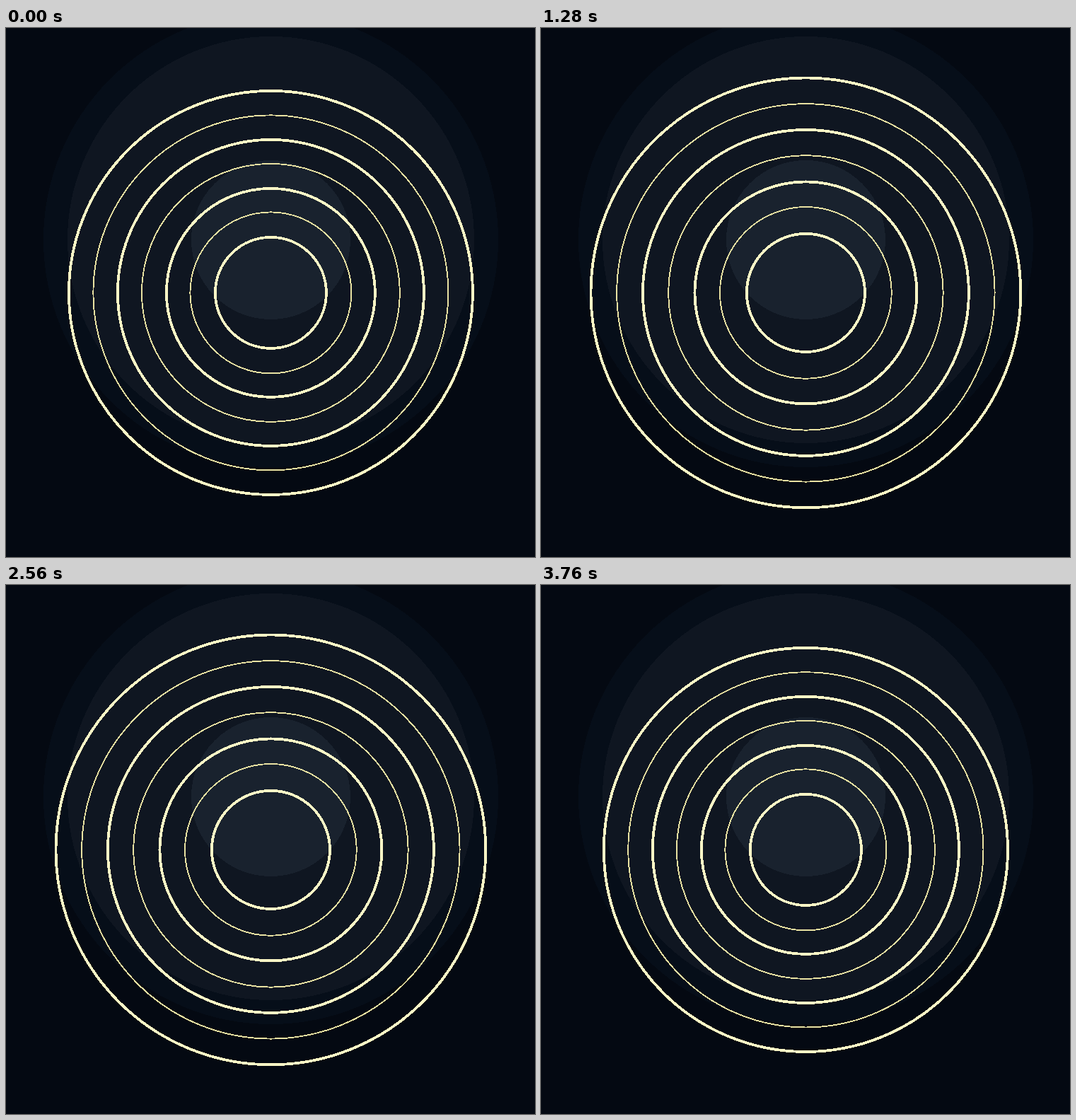
Animation of 748x748 px, one loop 3840 ms. Source, as an HTML page:

```html
<!DOCTYPE html>
<html lang="en">
<head>
<meta charset="utf-8">
<title>Breathing rings</title>
<style>
  html, body { margin: 0; width: 100%; height: 100%; overflow: hidden; background: #040912; }
  svg { display: block; width: 748px; height: 748px; }
</style>
</head>
<body>
<svg viewBox="0 0 748 748" shape-rendering="crispEdges">
  <g id="glow"></g>
  <g id="rings" fill="none"></g>
</svg>
<script>
const LOOP = 3840, STEP = 40, GROWTH = 0.086;

function addCircle(parent, attrs) {
  const circle = document.createElementNS('http://www.w3.org/2000/svg', 'circle');
  for (const name in attrs) circle.setAttribute(name, attrs[name]);
  document.getElementById(parent).append(circle);
  return circle;
}

[[321.5, '#060e19'], [287.5, '#0f1621'], [112.5, '#19222e']].forEach(([r, fill]) =>
  addCircle('glow', { cx: 374.5, cy: 299.5, r, fill }));

// Thick and thin rings alternate from the outside in.
const rings = Array.from({ length: 7 }, (_, i) => {
  const thin = i % 2;
  const radius = thin ? 251 - 68.5 * (i - 1) / 2 : 285.5 - 69 * i / 2;
  const circle = addCircle('rings', {
    cx: 374.4, cy: 374.4,
    stroke: thin ? '#e9e2a2' : '#fdf8c6',
    'stroke-width': thin ? 1.9 : 3.8
  });
  return { circle, radius };
});

function draw() {
  const time = Math.floor(performance.now() % LOOP / STEP) * STEP;
  const scale = 1 + GROWTH * (1 - Math.cos(2 * Math.PI * time / LOOP)) / 2;
  for (const { circle, radius } of rings) circle.setAttribute('r', radius * scale);
  requestAnimationFrame(draw);
}
draw();
</script>
</body>
</html>
```
